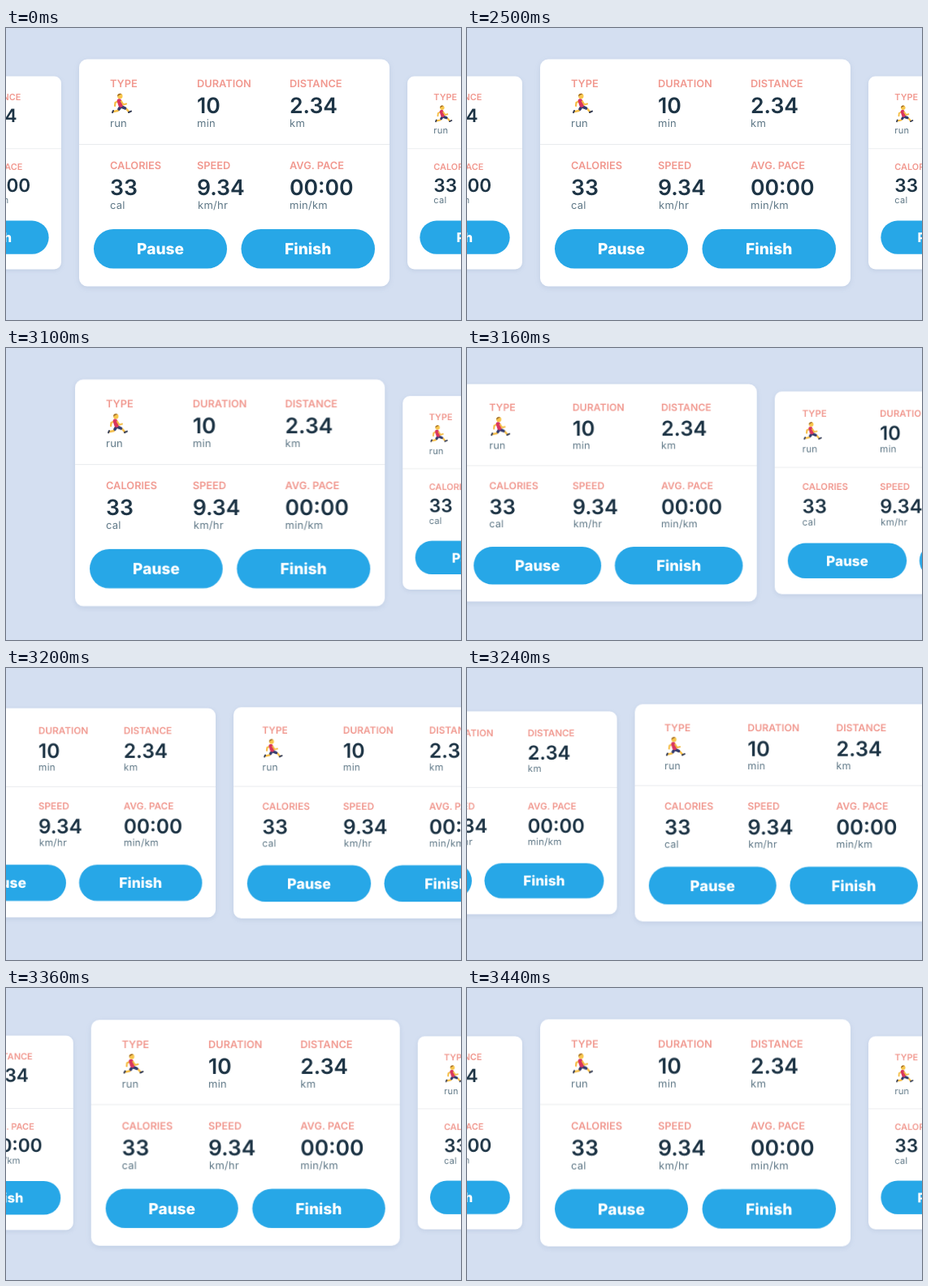
Recreate the animation shown at these times as an HTML page. Size 560 by 360 pixels, loop 3.46 s.

```html
<!DOCTYPE html>
<html lang="en">
<head>
<meta charset="utf-8">
<title>Workout cards</title>
<style>
  html, body { margin: 0; width: 100%; height: 100%; overflow: hidden; background: #d4dff1; }
  svg { display: block; width: 560px; height: 360px; }

  text { font-family: Inter, Roboto, sans-serif; text-rendering: geometricPrecision; }
  .label { font-size: 12.8px; font-weight: 600; fill: #f1988f; }
  .value { font-size: 26.6px; font-weight: 600; fill: #1d3445; }
  .unit { font-size: 13px; letter-spacing: .25px; fill: #5f7887; }
  .action { font-size: 19.1px; font-weight: 800; fill: #fff; text-anchor: middle; }
  .panel { fill: #fff; filter: drop-shadow(0 2px 3px rgba(70, 100, 150, .13)); }
  .button { fill: #27a7e7; }

  .card { animation: 3460ms linear infinite; }
  .previous { transform: translate(-94.4px, 178.5px) scale(.85); animation-name: drop; }
  .current { animation-name: leave; }
  .next { animation-name: enter; }
  .later { animation-name: follow; }

  /* The slide runs from 3091.5 ms to 3446.5 ms. */
  @keyframes leave {
    0%, 89.35% { transform: translate(281px, 178.5px) scale(1); animation-timing-function: ease; }
    99.61%, 100% { transform: translate(-94.4px, 178.5px) scale(.85); }
  }
  @keyframes enter {
    0%, 89.35% { transform: translate(656.4px, 178.5px) scale(.85); animation-timing-function: ease; }
    99.61%, 100% { transform: translate(281px, 178.5px) scale(1); }
  }
  @keyframes follow {
    0%, 89.35% { transform: translate(1003.4px, 178.5px) scale(.85); animation-timing-function: ease; }
    99.61%, 100% { transform: translate(656.4px, 178.5px) scale(.85); }
  }
  @keyframes drop {
    0% { opacity: 1; animation-timing-function: step-end; }
    87.861%, 100% { opacity: 0; }
  }
</style>
</head>
<body>
<svg viewBox="0 0 560 360">
  <defs>
    <g id="runner" fill="none" stroke-linecap="round" stroke-linejoin="round">
      <path d="M9.5 10 L5.5 12 L5 16" stroke="#f5bd45" stroke-width="2.2"/>
      <path d="M11 18 L8.5 22 L3.5 23" stroke="#f5bd45" stroke-width="2.6"/>
      <path d="M14 18 L19 19.5 L22 23" stroke="#f5bd45" stroke-width="2.6"/>
      <path d="M3 22 L2 24.2 M22 24 L25 22.6" stroke="#333a52" stroke-width="2"/>
      <path d="M12 17 L10 20 M13 17 L17.5 18.8" stroke="#333c72" stroke-width="3.6"/>
      <path d="M10.5 10 L12 15" stroke="#d9365f" stroke-width="5.6"/>
      <path d="M13 10.5 L15.5 14.5 L19 13.5" stroke="#f5bd45" stroke-width="2.2"/>
      <circle cx="11.3" cy="4" r="3.2" fill="#f8c64c"/>
      <path d="M8.1 4.5 A3.4 3.4 0 0 1 13.3 1.3 L10.3 2.8 Z" fill="#966328"/>
    </g>

    <g id="card" transform="translate(-191 -140.5)">
      <rect class="panel" y=".5" width="382" height="280" rx="10"/>
      <path d="M0 105.5 H382" stroke="#e9ebee"/>

      <g transform="translate(38 0)">
        <text class="label" y="35.2">TYPE</text>
        <use href="#runner" x="1" y="42"/>
        <text class="unit" y="84">run</text>
        <text class="label" y="136.2">CALORIES</text>
        <text class="value" y="168">33</text>
        <text class="unit" y="185">cal</text>
      </g>
      <g transform="translate(145 0)">
        <text class="label" y="35.2">DURATION</text>
        <text class="value" y="67">10</text>
        <text class="unit" y="84">min</text>
        <text class="label" y="136.2">SPEED</text>
        <text class="value" y="168">9.34</text>
        <text class="unit" x="1" y="185">km/hr</text>
      </g>
      <g transform="translate(259 0)">
        <text class="label" y="35.2">DISTANCE</text>
        <text class="value" y="67">2.34</text>
        <text class="unit" y="84">km</text>
        <text class="label" y="136.2">AVG. PACE</text>
        <text class="value" y="168">00:00</text>
        <text class="unit" y="185">min/km</text>
      </g>

      <rect class="button" x="18" y="210" width="164" height="48.5" rx="24.25"/>
      <text class="action" x="100" y="241">Pause</text>
      <rect class="button" x="199.5" y="210" width="164.5" height="48.5" rx="24.25"/>
      <text class="action" x="281.7" y="241">Finish</text>
    </g>
  </defs>

  <rect width="560" height="360" fill="#d4dff1"/>
  <g class="card previous"><use href="#card"/></g>
  <g class="card current"><use href="#card"/></g>
  <g class="card next"><use href="#card"/></g>
  <g class="card later"><use href="#card"/></g>
</svg>
</body>
</html>
```
